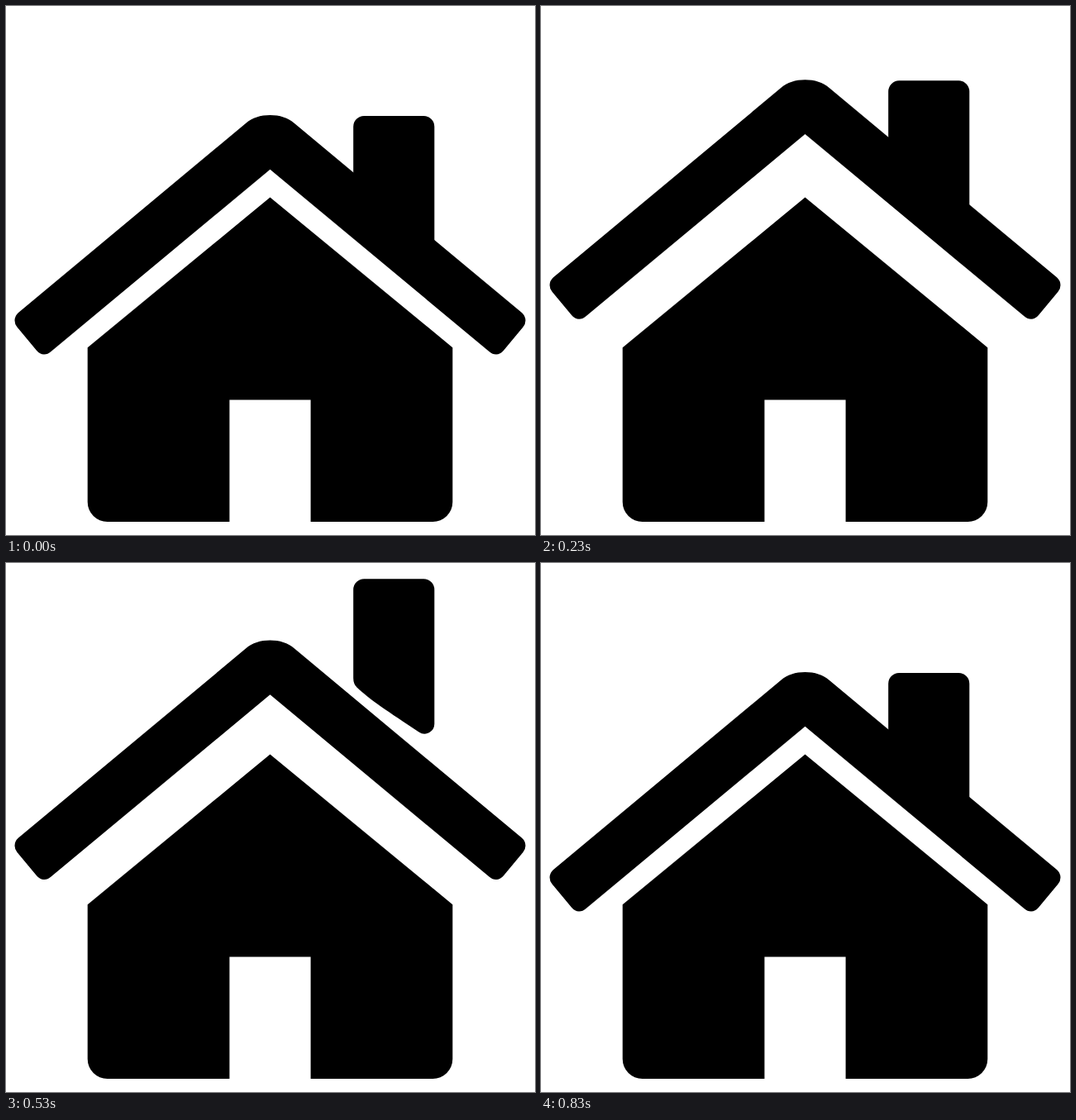
Recreate the animation shown at these times as an HTML page. Size 640 by 640 pixels, loop 1.43 s.

```html
<!DOCTYPE html>
<html lang="en">
<head>
<meta charset="utf-8">
<title>House</title>
<style>
  html, body { margin: 0; height: 100%; overflow: hidden; background: #fff; }
  svg { display: block; width: 100%; height: 100%; }
</style>
</head>
<body>
<svg viewBox="0 0 640 640">
  <path d="M319.5 231.5 L540.3 413.2 V600 A24 24 0 0 1 516.3 624 H368.6 V476.6 H270.4 V624 H122.7 A24 24 0 0 1 98.7 600 V413.2Z"/>
  <path id="chimney" d="M433.2 133 H505.3 A13 13 0 0 1 518.3 146 V308.5 A12 12 0 0 1 499.5 318.2 C463 294 440 279 424.5 264.3 Q420.2 260 420.2 253 V146 A13 13 0 0 1 433.2 133Z"/>
  <path id="roof" d="M290 142 C298 135.2 308 132 319.5 132 S341 135.2 349 142 L624 371 Q628.5 375 628.5 380.5 Q628.5 385 625.5 388.5 L602 416.7 Q598 421.5 593 421.5 Q588.5 421.5 584.5 418 L319.5 197.7 L54.5 418 Q50.5 421.5 46 421.5 Q41 421.5 37 416.7 L13.5 388.5 Q10.5 385 10.5 380.5 Q10.5 375 15 371Z"/>
</svg>
<script>
  const LOOP = 1430, LAST = 21;
  const roof = document.getElementById('roof');
  const chimney = document.getElementById('chimney');

  // Five steps every 200 ms, on an uneven beat
  const stepAt = t => Math.min(LAST,
    5 * Math.floor(t / 200) + [30, 70, 130, 170, 200].filter(b => b <= t % 200).length);

  // Linear rise from start to peak, linear fall to end
  const hop = (s, start, peak, end) =>
    Math.max(0, Math.min((s - start) / (peak - start), (end - s) / (end - peak)));

  const lift = (el, y) => el.setAttribute('transform', `translate(0 ${-y})`);

  function draw(now) {
    const s = stepAt(now % LOOP);
    lift(roof, 64 * hop(s, 0, 9, 19));
    lift(chimney, 128 * hop(s, 3, 12, 21));
    requestAnimationFrame(draw);
  }
  const begin = performance.now();
  draw(0);
</script>
</body>
</html>
```
